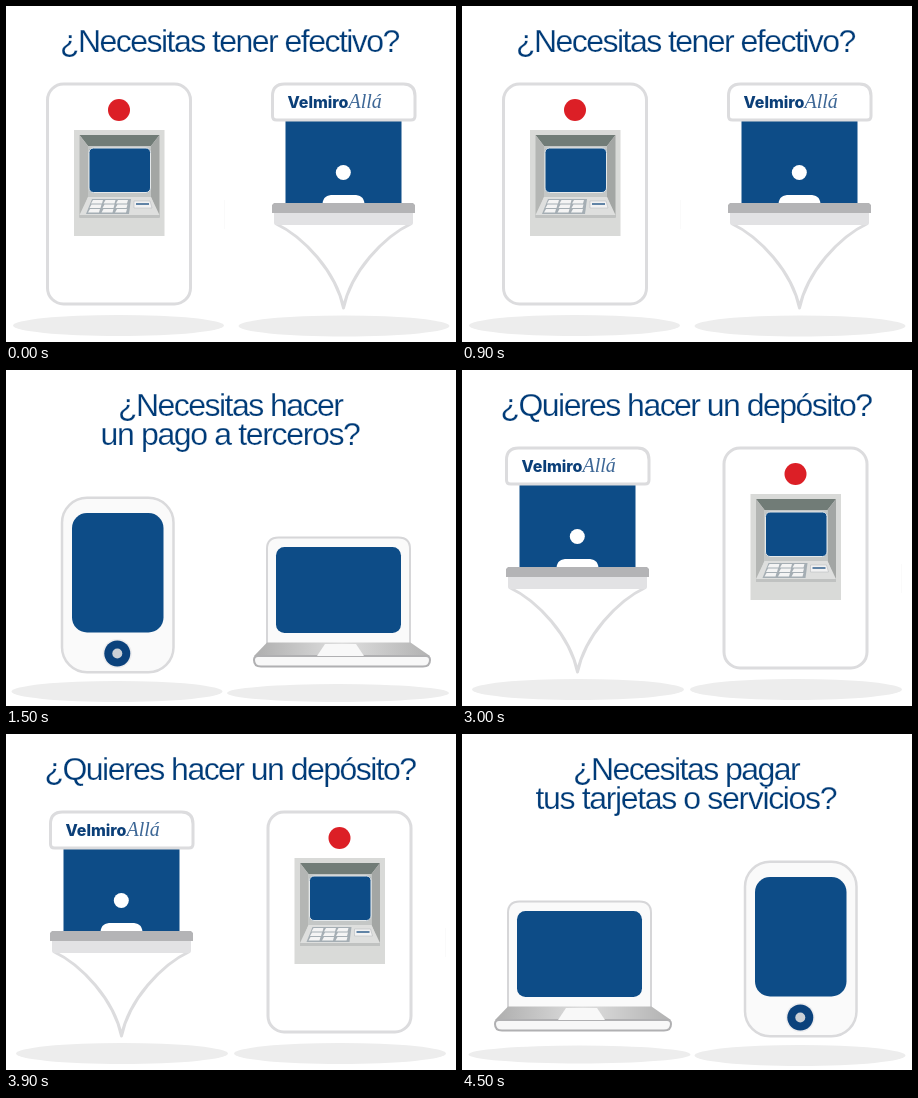
An HTML page for the animation above (6000 ms loop, 450 px wide and 336 px high).

```html
<!DOCTYPE html>
<html lang="es">
<head>
<meta charset="utf-8">
<title>Servicios</title>
<style>
  html, body { margin: 0; width: 100%; height: 100%; overflow: hidden; background: #fff; }
  svg { display: block; width: 100vw; height: 100vh; }
  .scene { visibility: hidden; animation: show 6s step-end infinite; }
  .s2 { animation-delay: -4.5s; }
  .s3 { animation-delay: -3s; }
  .s4 { animation-delay: -1.5s; }
  @keyframes show {
    0% { visibility: visible; }
    25%, 100% { visibility: hidden; }
  }
  .title {
    font: 32px "Liberation Sans", Arial, sans-serif;
    letter-spacing: -1.54px;
    fill: #003b78;
    stroke: #fff;
    stroke-width: .25px;
  }
  .loose { letter-spacing: -1.35px; }
  .blue { fill: #0d4c87; }
  .shadow { fill: #ededed; }
  .line { fill: #fff; stroke: #dcdcde; stroke-width: 3; stroke-linejoin: round; }
  .sans { font: 800 16px Inter, Arial, sans-serif; fill: #0b3f78; }
  .serif { font: italic 20px "Liberation Serif", "Times New Roman", serif; fill: #3d6796; }
</style>
</head>
<body>
<svg viewBox="0 0 450 336" preserveAspectRatio="none">
  <defs>
    <linearGradient id="deck">
      <stop offset="0" stop-color="#aeaeae"/>
      <stop offset=".5" stop-color="#dedede"/>
      <stop offset="1" stop-color="#b2b2b2"/>
    </linearGradient>

    <g id="atm">
      <rect class="line" x="41.5" y="78" width="143" height="220" rx="16"/>
      <circle cx="113" cy="104" r="11" fill="#dc1f26"/>
      <rect x="68" y="124" width="90.5" height="106" fill="#d9dad8"/>
      <path d="M73.500 129H153.500L145 140H82Z" fill="#717c77"/>
      <path d="M73.500 129L82 140V191L73.500 212Z" fill="#b4b6b4"/>
      <path d="M153.500 129L145 140V191L153.500 212Z" fill="#a3a6a4"/>
      <rect x="82" y="140" width="63" height="52" fill="#c4c7c6"/>
      <rect class="blue" x="83" y="142" width="61.500" height="44.500" rx="4.500" stroke="#e4e8ea"/>
      <path d="M82 191H145L153.500 209H73.500Z" fill="#dedfde"/>
      <path d="M73.500 209H153.500V212H73.500Z" fill="#c0c2c1"/>
      <path d="M86 193H125L123 208H80Z" fill="#a5aeb4"/>
      <g fill="#f4f4f4">
        <path id="key" d="M87 194h10l-1 3.500h-11z"/>
        <use href="#key" x="12.500"/><use href="#key" x="25"/>
        <use href="#key" x="-1.500" y="4.500"/><use href="#key" x="11.500" y="4.500"/><use href="#key" x="24.500" y="4.500"/>
        <use href="#key" x="-3" y="9"/><use href="#key" x="10.500" y="9"/><use href="#key" x="24" y="9"/>
      </g>
      <path d="M128 195H144L146 202H128Z" fill="#f2f2f2" stroke="#b9bdc0" stroke-width=".6"/>
      <path d="M130 198H143" stroke="#315f8d" stroke-width="1.500"/>
    </g>

    <g id="kiosk">
      <path class="line" d="M269.500 217.500C298 231 330 266 337.500 302C345 266 377 231 405.500 217.500"/>
      <path d="M268 206H407V217Q407 219 405 219H270Q268 219 268 217Z" fill="#e2e2e4"/>
      <rect class="blue" x="279.500" y="112" width="116" height="86"/>
      <path class="line" d="M278.500 78H397.500Q409 78 409 90V110Q409 114 405 114H270.500Q266.500 114 266.500 110V90Q266.500 78 278.500 78Z"/>
      <text class="sans" x="281.500" y="101.500">Velmiro<tspan class="serif">Allá</tspan></text>
      <circle cx="337.300" cy="166.500" r="7.500" fill="#fff"/>
      <path d="M316.500 198C317 191 321 189 327 189H348C354 189 358 191 358.500 198Z" fill="#fff"/>
      <path d="M268 197H407L409 199V207H266V199Z" fill="#b4b4b6"/>
    </g>

    <g id="phone">
      <rect x="56" y="127.700" width="111.500" height="174.500" rx="25" fill="#fafafa" stroke="#dadadc" stroke-width="2.500"/>
      <rect class="blue" x="66" y="143" width="91.500" height="119.500" rx="15"/>
      <circle cx="111.300" cy="283.500" r="14.500" fill="#ececee"/>
      <circle cx="111.300" cy="283.500" r="13" fill="#0b427c"/>
      <circle cx="111.300" cy="283.500" r="5" fill="#cbd0d6"/>
    </g>

    <g id="laptop">
      <path d="M261 274V179Q261 167.500 272.500 167.500H392.500Q404 167.500 404 179V274Z" fill="#fafafa" stroke="#d6d6d8" stroke-width="2"/>
      <rect class="blue" x="270" y="177" width="125" height="86" rx="8.500"/>
      <path d="M261 272.500H404.500L424 286H248Z" fill="url(#deck)"/>
      <path d="M252 286H420Q424 286 424 290Q424 296.500 417 296.500H255Q248 296.500 248 290Q248 286 252 286Z" fill="#f8f8f8" stroke="#b0b0b2" stroke-width="2"/>
      <path d="M319 274H350L358 286H311Z" fill="#f8f8f8"/>
    </g>
  </defs>

  <rect width="450" height="336" fill="#fff"/>

  <g class="scene s1">
    <text class="title" x="54" y="46">¿Necesitas tener efectivo?</text>
    <ellipse class="shadow" cx="112.500" cy="319.500" rx="105.500" ry="10.500"/>
    <ellipse class="shadow" cx="338" cy="320" rx="105.500" ry="10.500"/>
    <path d="M218.500 194V223" stroke="#fafafa"/>
    <use href="#atm"/>
    <use href="#kiosk"/>
  </g>

  <g class="scene s2">
    <text class="title" x="112" y="46">¿Necesitas hacer</text>
    <text class="title loose" x="94.500" y="75">un pago a terceros?</text>
    <ellipse class="shadow" cx="111" cy="321.500" rx="105.500" ry="10.500"/>
    <ellipse class="shadow" cx="332" cy="323" rx="111" ry="9"/>
    <use href="#phone"/>
    <use href="#laptop"/>
  </g>

  <g class="scene s3">
    <text class="title" x="38.500" y="46">¿Quieres hacer un depósito?</text>
    <ellipse class="shadow" cx="116" cy="319.500" rx="106" ry="10.500"/>
    <ellipse class="shadow" cx="334" cy="319.500" rx="106" ry="10.500"/>
    <path d="M439.500 194V223" stroke="#fafafa"/>
    <use href="#kiosk" x="-222"/>
    <use href="#atm" x="220.500"/>
  </g>

  <g class="scene s4">
    <text class="title" x="111" y="46">¿Necesitas pagar</text>
    <text class="title loose" x="73.500" y="75">tus tarjetas o servicios?</text>
    <ellipse class="shadow" cx="117.500" cy="320.500" rx="111" ry="9"/>
    <ellipse class="shadow" cx="338" cy="321.500" rx="105.500" ry="10.500"/>
    <use href="#laptop" x="-215"/>
    <use href="#phone" x="227"/>
  </g>
</svg>
</body>
</html>
```
